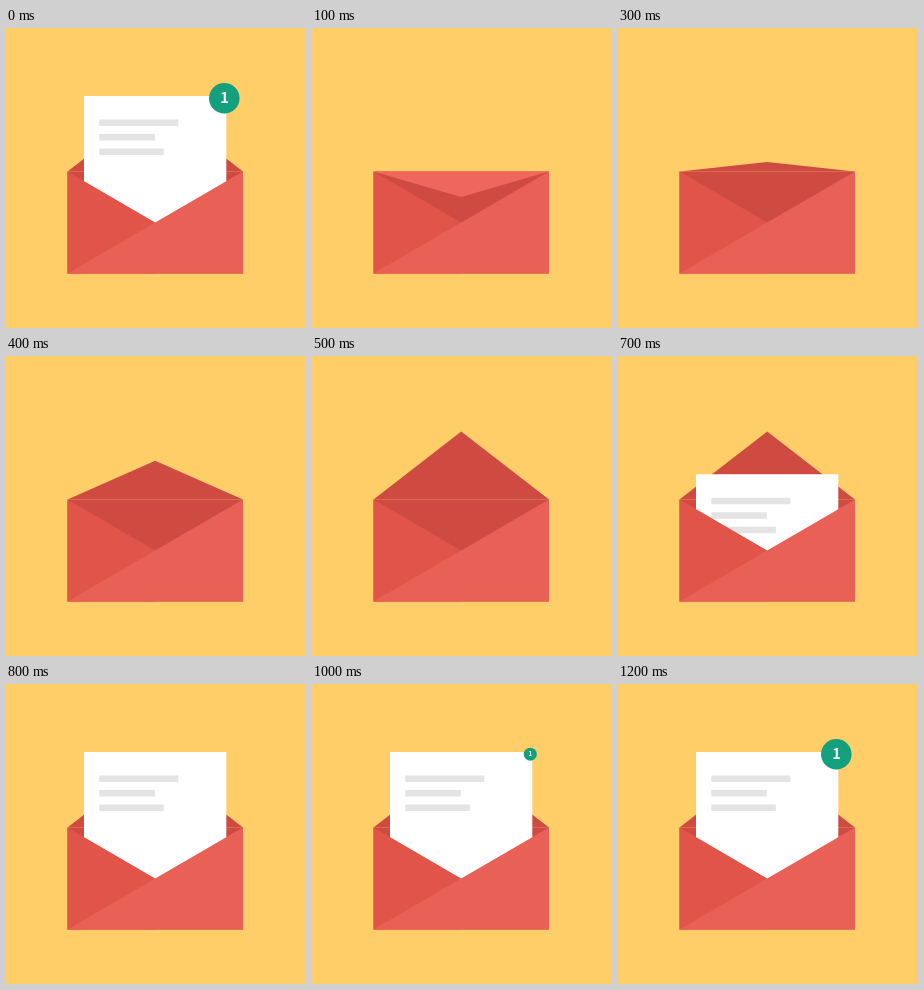
Recreate the animation shown at these times as an HTML page with a canvas. Size 300 by 300 pixels, loop 3.2 s.

```html
<!DOCTYPE html>
<html lang="en">
<head>
<meta charset="utf-8">
<title>New mail</title>
<style>
  html, body { margin: 0; width: 100%; height: 100%; overflow: hidden; background: #ffce69; }
  canvas { display: block; width: 300px; height: 300px; }
</style>
</head>
<body>
<canvas id="stage" width="300" height="300"></canvas>
<script>
const ctx = document.getElementById('stage').getContext('2d');
const LOOP = 3200, STEP = 100;
const LEFT = 61.5, RIGHT = 237, TOP = 143.5, BOTTOM = 245.5;
const MID = 149.2, FOLD = 194.5;
const FLAP_SHUT = 169, FLAP_OPEN = 75.5;

const C = {
  bg: '#ffce69', inside: '#cf4b42', flap: '#ef665c',
  left: '#e15449', right: '#e96056',
  paper: '#ffffff', line: '#e4e4e4', badge: '#14a07c'
};

const clamp = (v, lo, hi) => Math.min(hi, Math.max(lo, v));

function poly(color, ...pts) {
  ctx.fillStyle = color;
  ctx.beginPath();
  pts.forEach(([x, y]) => ctx.lineTo(x, y));
  ctx.closePath();
  ctx.fill();
}

function rect(color, x, y, w, h) {
  ctx.fillStyle = color;
  ctx.fillRect(x, y, w, h);
}

// Pose for a time held on 100 ms steps; the loop opens on the final pose.
function poseAt(ms) {
  const t = ms < 100 ? LOOP : Math.floor(ms / STEP) * STEP;
  return {
    flap: t < 300 ? FLAP_SHUT : Math.max(FLAP_OPEN, 134 - 0.2925 * (t - 300)),
    paper: t < 600 ? null : Math.max(68, 168.5 - 0.5025 * (t - 600)),
    badge: t < 900 ? 0 : clamp(2.1 + 0.0439 * (t - 900), 0, 15.3)
  };
}

function drawPaper(y) {
  rect(C.paper, 78, y, 142.3, 210 - y);
  [79, 55.5, 64.5].forEach((w, i) => rect(C.line, 93.3, y + 23.5 + i * 14.5, w, 6.5));
}

function drawBadge(r) {
  ctx.save();
  ctx.translate(218.3, 70.2);
  ctx.scale(r / 15.3, r / 15.3);
  ctx.fillStyle = C.badge;
  ctx.beginPath();
  ctx.arc(0, 0, 15.3, 0, Math.PI * 2);
  ctx.fill();
  ctx.fillStyle = '#fff';
  ctx.font = 'bold 14.5px "Noto Sans CJK JP", "Noto Sans CJK SC", "Noto Sans", sans-serif';
  ctx.textAlign = 'center';
  ctx.textBaseline = 'alphabetic';
  ctx.fillText('1', 0.3, 5);
  ctx.restore();
}

function draw(ms) {
  const { flap, paper, badge } = poseAt(ms);
  const a = [LEFT, TOP], b = [RIGHT, TOP], c = [RIGHT, BOTTOM], d = [LEFT, BOTTOM];
  const fold = [MID, FOLD];

  rect(C.bg, 0, 0, 300, 300);
  rect(C.inside, LEFT, TOP, RIGHT - LEFT, BOTTOM - TOP);
  if (flap < TOP) poly(C.inside, a, [MID, flap], b);
  if (paper !== null) drawPaper(paper);
  poly(C.left, a, fold, [MID, BOTTOM], d);
  poly(C.right, b, c, d, fold);
  if (flap > TOP) poly(C.flap, a, b, [MID, flap]);
  if (badge) drawBadge(badge);
}

const start = performance.now();
function tick() {
  draw((performance.now() - start) % LOOP);
  requestAnimationFrame(tick);
}
tick();
</script>
</body>
</html>
```
